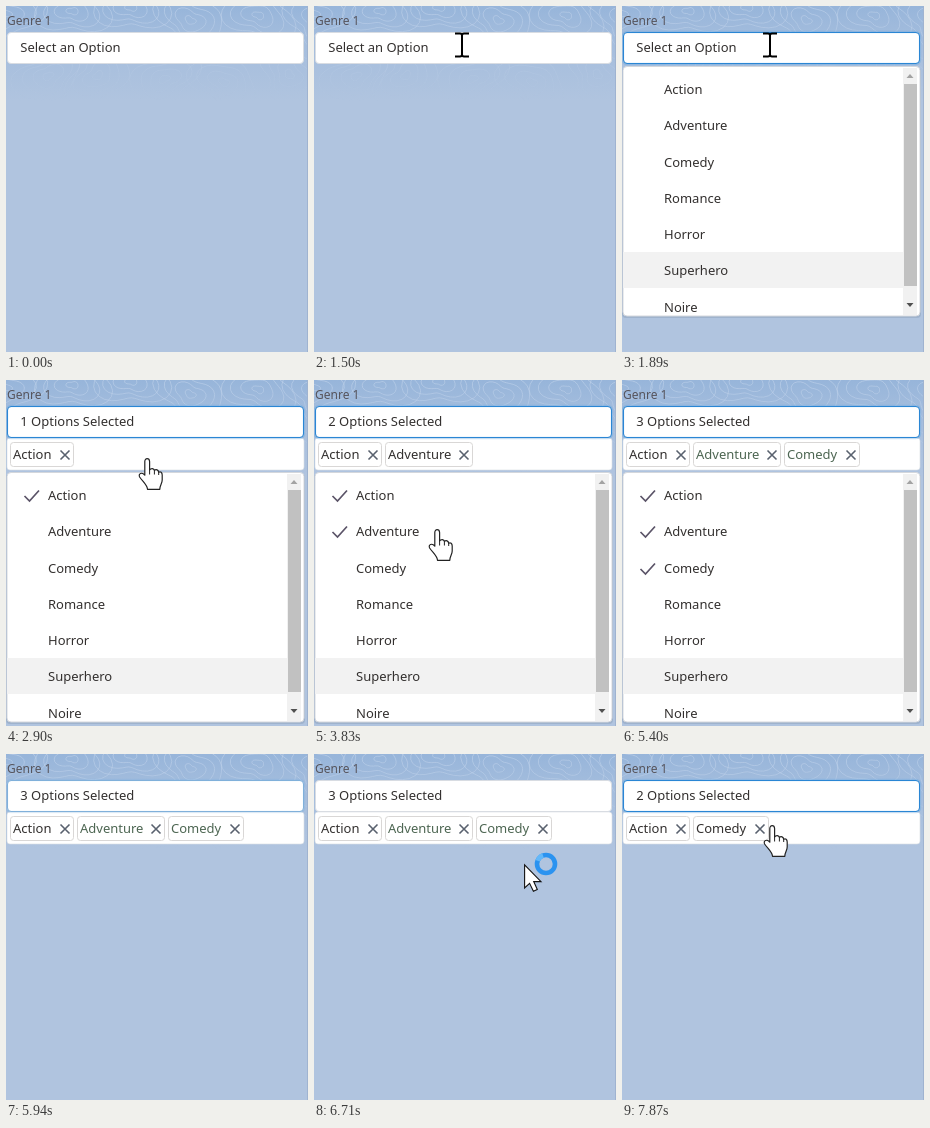
Animation of 302x346 px, one loop 8 s. Source, as an HTML page:

```html
<!DOCTYPE html>
<html lang="en">
<head>
<meta charset="utf-8">
<title>Genre picker</title>
<style>
html, body { margin: 0; width: 100%; height: 100%; overflow: hidden; background: #b0c4df; }
svg { display: block; width: 302px; height: 346px; }
text { font: 13px "Noto Sans", "Open Sans", sans-serif; fill: #33302f; }
.label { font-size: 12px; fill: #56545c; }
.chip rect { fill: #fff; stroke: #d9d7d6; }
.cross { fill: none; stroke: #59616e; stroke-width: 1.6; }
.tick { fill: none; stroke: #5b5468; stroke-width: 1.7; }
</style>
</head>
<body>
<svg viewBox="0 0 302 346">
  <defs>
    <linearGradient id="sky" x1="0" y1="0" x2="0" y2="1">
      <stop offset="0" stop-color="#97b5da"/>
      <stop offset=".35" stop-color="#a4bddd"/>
      <stop offset="1" stop-color="#b0c4df"/>
    </linearGradient>
    <linearGradient id="fade" x1="0" y1="0" x2="0" y2="1">
      <stop offset="0" stop-color="#fff"/>
      <stop offset="1" stop-color="#000"/>
    </linearGradient>
    <mask id="fadeMask" maskUnits="userSpaceOnUse" x="0" y="0" width="302" height="95">
      <rect width="302" height="95" fill="url(#fade)"/>
    </mask>
    <clipPath id="panelClip"><rect x="1" y="1" width="297" height="248" rx="3"/></clipPath>
  </defs>

  <rect width="302" height="346" fill="#b0c4df"/>
  <rect width="302" height="95" fill="url(#sky)"/>
  <g mask="url(#fadeMask)"><path id="contours" fill="none" stroke="#c9daef" stroke-opacity=".5"/></g>
  <path d="M301.5 0V346" stroke="#9fb3d0"/>

  <text class="label" x="1" y="19">Genre 1</text>

  <g id="tray">
    <rect x="1" y="58" width="297" height="32" rx="3" fill="#fff" stroke="#d9dde3" stroke-width=".6"/>
    <g id="chips"></g>
  </g>
  <rect x="1.5" y="26.5" width="296" height="31" rx="3.5" fill="#fff" stroke="#d8dce2"/>
  <g id="focus" fill="none">
    <rect x="1" y="26" width="297" height="32" rx="4" stroke="#5aa2e0" stroke-opacity=".3" stroke-width="2.4"/>
    <rect x="1.5" y="26.5" width="296" height="31" rx="3.5" stroke="#2a86d4"/>
  </g>
  <text id="summary" x="14.3" y="46"></text>

  <g id="panel">
    <rect x="0" y="2" width="299" height="250" rx="4" fill="#6d7f99" fill-opacity=".25"/>
    <rect x="1" y=".5" width="297" height="249.5" rx="4" fill="#fff" stroke="#d4d7dc"/>
    <g clip-path="url(#panelClip)">
      <rect x="1" y="186" width="280" height="36" fill="#f2f2f2"/>
      <g id="options"></g>
      <rect x="281" y="2" width="14" height="247" fill="#f1f1f1"/>
      <rect id="thumb" x="282" y="18" width="13" height="202" fill="#c1c1c1"/>
      <path d="M284.5 12L288 8L291.5 12Z" fill="#a3a3a3"/>
      <path d="M284.5 237L288 241L291.5 237Z" fill="#505050"/>
    </g>
  </g>

  <g id="cursor">
    <g id="arrow">
      <path d="M.6 .8V24L5.6 19.3L9.4 27.2L13.3 25.4L9.7 17.6H17Z" fill="#fff" stroke="#111" stroke-width="1.1"/>
      <g id="busy" fill="none" stroke-width="4.6">
        <circle cx="22" cy="0" r="9" stroke="#2b93f0"/>
        <path d="M13.6 -3.2A9 9 0 0 1 19 -8.5" stroke="#62b8fa"/>
      </g>
    </g>
    <path id="beam" d="M-7 -11.5H-2Q0 -11.5 0 -9.5Q0 -11.5 2 -11.5H7M0 -10V10M-7 11.5H-2Q0 11.5 0 9.5Q0 11.5 2 11.5H7" fill="none" stroke="#000" stroke-width="2"/>
    <g id="hand" stroke="#222" stroke-width="1.2" stroke-linejoin="round">
      <path d="M-3.2 2.5C-3.2 -1.4 1.4 -1.4 1.6 2.5V11C3 8.8 6 9.2 6.4 11.4C8 10 10.4 10.8 10.7 13.2C12.6 12.2 14.2 13.4 14.2 16V21C14.2 24.5 11.8 26 11.8 30.3H-.5C-.7 26 -4.4 23.5 -8.4 18C-10 14.6 -6 12.6 -3.2 16.2Z" fill="#fff"/>
      <path d="M1.6 10V15.5M6.4 11.5V15.5M10.7 13V16" fill="none" stroke-width="1"/>
    </g>
  </g>
</svg>
<script>
const LOOP = 8000;
const $ = id => document.getElementById(id);
const show = (id, on) => $(id).setAttribute("display", on ? "inline" : "none");

const genres = ["Action", "Adventure", "Comedy", "Romance", "Horror", "Superhero", "Noire"];
const chipWidth = { Action: 64, Adventure: 88, Comedy: 76 };

// Selection, from the given time on
const picks = [[0, []], [2900, [0]], [3830, [0, 1]], [4770, [0, 1, 2]], [7790, [0, 2]]];

// Cursor moves: start, end, steps, first point, last point
const moves = [
  [270, 440, 3, 196, 265, 175, 156],
  [750, 1330, 8, 173, 146, 149, 35],
  [1415, 1500, 2, 148, 37, 148, 39],
  [2360, 2750, 6, 148, 43, 142, 79],
  [2900, 3600, 10, 142, 79, 124, 150],
  [4070, 4390, 5, 124, 156, 128, 184],
  [5020, 5325, 5, 136, 190, 294, 284],
  [6250, 6400, 3, 265, 153, 222, 126],
  [6710, 7500, 11, 210, 110, 151, 72]
];

function drawContours() {
  let seed = 11, d = "";
  const rnd = () => (seed = seed * 16807 % 2147483647) / 2147483647;
  for (let c = 0; c < 11; c++) {
    const cx = c * 30 + rnd() * 14, cy = c % 2 ? 62 + rnd() * 20 : rnd() * 18;
    const p = rnd() * 6, q = rnd() * 6;
    for (let r = 4; r < 30; r += 7) {
      for (let i = 0; i < 36; i++) {
        const a = i * Math.PI / 18;
        const s = r * (1 + .22 * Math.sin(2 * a + p) + .14 * Math.sin(3 * a + q + r / 12));
        d += (i ? "L" : "M") + (cx + s * 1.25 * Math.cos(a)).toFixed(1) + " " + (cy + s * Math.sin(a)).toFixed(1);
      }
      d += "Z";
    }
  }
  $("contours").setAttribute("d", d);
}

function buildOptions() {
  $("options").innerHTML = genres.map((name, i) =>
    `<g transform="translate(0 ${23 + Math.round(i * 36.25)})">
      <path class="tick" id="tick${i}" d="M18.5 1L23.5 6L33 -4.5"/>
      <text x="42" y="5">${name}</text></g>`).join("");
}

function chipMarkup(selected) {
  let x = 4.5;
  return selected.map(i => {
    const name = genres[i], w = chipWidth[name], left = x;
    const tint = selected.length === 3 && i ? "#4d6652" : "#33302f";
    x += w + 3;
    return `<g class="chip" transform="translate(${left} 62.5)">
      <rect width="${w - 1}" height="24" rx="3"/>
      <text x="2.5" y="16.5" style="fill:${tint}">${name}</text>
      <path class="cross" d="M${w - 14} 8l9 9m0-9l-9 9"/></g>`;
  }).join("");
}

function cursorAt(t) {
  const m = moves.filter(v => v[0] <= t).pop();
  if (!m || (t >= 5400 && t < 6250)) return null;
  const [start, end, n, x0, y0, x1, y1] = m;
  const k = Math.min(n - 1, Math.floor((t - start) / (end - start) * (n - 1) + .001));
  const u = k / (n - 1), e = u * (2 - u);
  return [x0 + (x1 - x0) * e, y0 + (y1 - y0) * e];
}

function cursorKind(t, x, y) {
  if (t < 1810) return y < 58 ? "beam" : "arrow";
  if (t < 2750 && y < 59) return "beam";
  if (t < 5940) return x < 281 ? "hand" : "arrow";
  return y < 88 ? "hand" : "arrow";
}

let lastPick = null;
function draw(t) {
  const selected = picks.filter(p => p[0] <= t).pop()[1];
  if (selected !== lastPick) {
    lastPick = selected;
    $("chips").innerHTML = chipMarkup(selected);
    $("summary").textContent = selected.length ? selected.length + " Options Selected" : "Select an Option";
    genres.forEach((_, i) => show("tick" + i, selected.includes(i)));
    show("tray", selected.length);
    $("panel").setAttribute("transform", `translate(0 ${selected.length ? 92 : 60})`);
  }
  show("panel", t >= 1810 && t < 5940);

  const half = (t >= 1810 && t < 1890) || (t >= 5940 && t < 6020) || (t >= 7790 && t < 7870);
  const full = (t >= 1890 && t < 5940) || t >= 7870;
  $("focus").setAttribute("opacity", full ? 1 : half ? .5 : 0);

  const pos = cursorAt(t);
  show("cursor", pos);
  $("thumb").setAttribute("fill", pos && t < 5400 && pos[0] > 281 ? "#a8a8a8" : "#c1c1c1");
  if (pos) {
    const kind = cursorKind(t, ...pos);
    $("cursor").setAttribute("transform", `translate(${pos[0].toFixed(1)} ${pos[1].toFixed(1)})`);
    ["arrow", "beam", "hand"].forEach(k => show(k, k === kind));
    show("busy", t >= 6250);
  }
}

drawContours();
buildOptions();
const begin = performance.now();
function tick() {
  draw((performance.now() - begin) % LOOP);
  requestAnimationFrame(tick);
}
tick();
</script>
</body>
</html>
```
